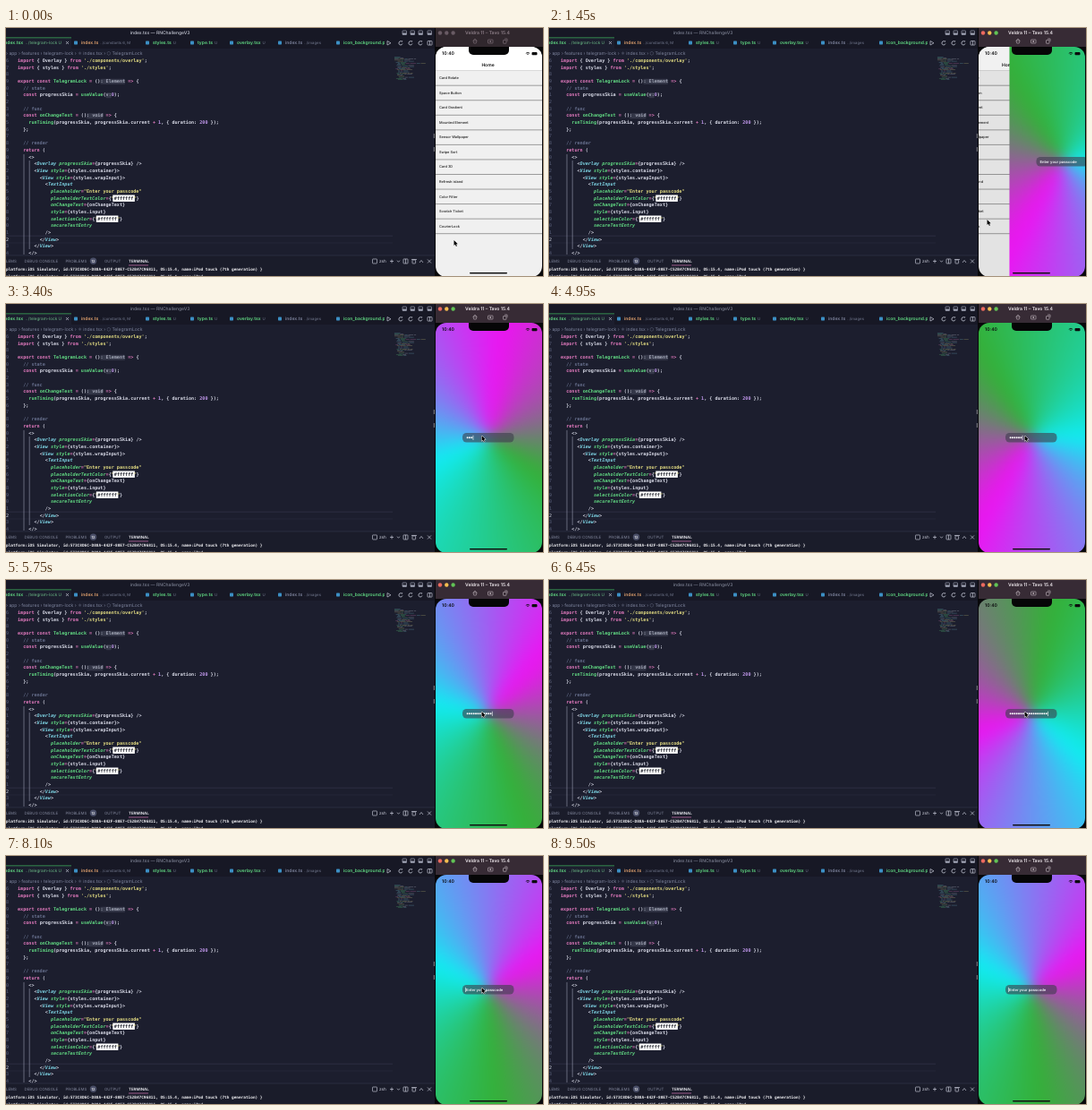
These frames come from a looping animation (600x277 px, 9550 ms). An HTML page with a canvas:

```html
<!DOCTYPE html>
<html lang="en">
<head>
<meta charset="utf-8">
<title>Passcode lock demo</title>
<style>
html, body { margin: 0; width: 100%; height: 100%; overflow: hidden; background: #1c1e2e; }
canvas { display: block; }
</style>
</head>
<body>
<canvas id="stage" width="600" height="277"></canvas>
<script>
const ctx = document.getElementById('stage').getContext('2d');
const LOOP = 9550;
const SANS = 'Inter, sans-serif', MONO = '"DejaVu Sans Mono", monospace';
const PHONE = { x: 480, y: 21, w: 119, h: 257 };

// One key letter per syntax colour; upper case means italic.
const INK = {
  p: '#e57bc0', w: '#d9dbe8', g: '#62dc84', c: '#7fd6e6', y: '#e3dc82',
  o: '#c49af0', m: '#68718f', h: '#a4a8b8', x: '#22242e'
};
const CODE = [
  "~pimport ~w{ Overlay } ~pfrom ~y'./components/overlay'~w;",
  "~pimport ~w{ styles } ~pfrom ~y'./styles'~w;",
  "",
  "~pexport const ~gTelegramLock ~p= ~w()~h: Element~p => ~w{",
  "  ~m// state",
  "  ~pconst ~wprogressSkia ~p= ~guseValue~w(~hv:~o0~w);",
  "",
  "  ~m// func",
  "  ~pconst ~gonChangeText ~p= ~w()~h: void~p => ~w{",
  "    ~grunTiming~w(progressSkia, progressSkia.current ~p+ ~o1~w, { duration: ~o200 ~w});",
  "  ~w};",
  "",
  "  ~m// render",
  "  ~preturn ~w(",
  "    ~w<>",
  "      ~w<~COverlay ~GprogressSkia~p=~w{progressSkia} />",
  "      ~w<~CView ~Gstyle~p=~w{styles.container}>",
  "        ~w<~CView ~Gstyle~p=~w{styles.wrapInput}>",
  "          ~w<~CTextInput",
  "            ~Gplaceholder~p=~y\"Enter your passcode\"",
  "            ~GplaceholderTextColor~p=~w{~y\"~x#ffffff~y\"~w}",
  "            ~GonChangeText~p=~w{onChangeText}",
  "            ~Gstyle~p=~w{styles.input}",
  "            ~GselectionColor~p=~w{~y\"~x#ffffff~y\"~w}",
  "            ~GsecureTextEntry",
  "          ~w/>",
  "        ~w</~CView~w>",
  "      ~w</~CView~w>",
  "    ~w</>"
];
const ROWS = ['Card Rotate', 'Space Button', 'Card Gradient', 'Mounted Element',
  'Sensor Wallpaper', 'Swipe Sort', 'Card 3D', 'Refresh island', 'Color Filter',
  'Scratch Ticket', 'CourierLock'];

const series = (count, start, step) => Array.from({ length: count }, (_, i) => start + i * step);
const typed = [2600, 2850, 3280, 4150, 4400, 4650, ...series(12, 5115, 110), 6470, 6600];
const CLEARED = 7600;
const presses = [...typed, CLEARED];

const clamp = v => Math.max(0, Math.min(1, v));
const smooth = v => { v = clamp(v); return v * v * (3 - 2 * v); };

function rect(x, y, w, h, color, radius = 0) {
  ctx.fillStyle = color;
  ctx.beginPath();
  ctx.roundRect(x, y, w, h, radius);
  ctx.fill();
}

function text(str, x, y, color, size = 5, weight = 400, family = SANS, align = 'left') {
  ctx.font = `${weight} ${size}px ${family}`;
  ctx.textAlign = align;
  ctx.fillStyle = color;
  ctx.fillText(str, x, y);
  return ctx.measureText(str).width;
}

function line(points, color, width = 0.7) {
  ctx.strokeStyle = color;
  ctx.lineWidth = width;
  ctx.beginPath();
  for (let i = 0; i < points.length; i += 2) ctx.lineTo(points[i], points[i + 1]);
  ctx.stroke();
}

function box(x, y, w, h, color, radius = 0.5) {
  ctx.strokeStyle = color;
  ctx.lineWidth = 0.7;
  ctx.beginPath();
  ctx.roundRect(x, y, w, h, radius);
  ctx.stroke();
}

function arc(x, y, r, from, to, color) {
  ctx.strokeStyle = color;
  ctx.lineWidth = 0.8;
  ctx.beginPath();
  ctx.arc(x, y, r, from * Math.PI, to * Math.PI);
  ctx.stroke();
}

function disc(x, y, r, color) {
  ctx.fillStyle = color;
  ctx.beginPath();
  ctx.arc(x, y, r, 0, 7);
  ctx.fill();
}

function codeLine(source, y) {
  let x = 13;
  for (const part of source.split(/(~\w[^~]*)/)) {
    if (!part) continue;
    if (part[0] !== '~') { x += part.length * 3.08; continue; }
    const key = part[1], kind = key.toLowerCase(), str = part.slice(2);
    const width = str.length * 3.08;
    if (kind === 'h') rect(x, y - 3, width, 6, '#343748', 1);
    if (kind === 'x') rect(x - 1.5, y - 3.7, width + 3, 7.4, '#fff');
    text(str, x, y, INK[kind], 5.12, key === kind ? 700 : 'italic 700', MONO);
    x += width;
  }
}

function tab(x, name, color, note = '') {
  rect(x, 14.5, 4, 4, '#3c8fc4', 0.7);
  const w = text(name, x + 8, 16.8, color, 5, 600);
  text(note, x + 10 + w, 16.8, '#73798f', 4.3);
}

function minimap() {
  const hues = [INK.p, INK.c, INK.g, INK.w, INK.y];
  let seed = 7;
  const random = () => (seed = seed * 16807 % 2147483647) / 2147483647;
  ctx.globalAlpha = 0.36;
  for (let i = 0; i < 22; i++) {
    let x = 434 + (i < 4 ? 0 : 1 + random() * 4);
    const end = x + 4 + random() * (i < 12 ? 25 : 13);
    while (x < end) {
      const w = 2 + random() * 5;
      rect(x, 32 + i * 1.2, w, 0.6, hues[Math.floor(random() * 5)]);
      x += w + 0.8;
    }
  }
  ctx.globalAlpha = 1;
}

function editor(focused) {
  rect(0, 0, 480, 277, '#1c1e2e');
  rect(0, 0, 480, 23, '#171825');
  text('index.tsx — RNChallengeV3', 172, 5.5, focused ? '#c9ccd8' : '#7c8092', 5, 500, SANS, 'center');
  for (const x of [443, 452, 461, 471]) {
    box(x, 3, 4.5, 4.5, '#9ca0b0');
    rect(x, 5.5, 4.5, 2, '#9ca0b0');
  }

  rect(0, 11, 73, 12, '#1c1e2e');
  rect(0, 10.4, 73, 0.8, '#3fae5c');
  text('index.tsx', -3, 16.8, '#62dc84', 5, 600);
  text('../telegram-lock U', 22, 16.8, '#6bb985', 4.7);
  line([67, 15, 70, 18], '#c5c8d6');
  line([70, 15, 67, 18], '#c5c8d6');
  tab(76, 'index.ts', '#e2a26e', '../constants 6, M');
  tab(156, 'styles.ts', '#62dc84', 'U');
  tab(206, 'type.ts', '#62dc84', 'U');
  tab(250, 'overlay.tsx', '#62dc84', 'U');
  tab(304, 'index.ts', '#7d839c', '../images');
  rect(368, 11.2, 112, 11.8, '#171825');
  tab(369, 'icon_background.p', '#62dc84');
  rect(423, 9, 57, 14, '#171825');
  line([426, 14.5, 430, 16.8, 426, 19, 426, 14.5], '#c5c8d6');
  for (const x of [441, 452, 463]) {
    arc(x, 16.8, 2.1, 0.1, 1.7, '#c5c8d6');
    disc(x + 1.6, 14.8, 0.6, '#c5c8d6');
  }
  box(471, 14.5, 5, 4.5, '#c5c8d6');
  line([473.5, 14.5, 473.5, 19], '#c5c8d6');

  text('› app › features › telegram-lock › ⚛ index.tsx › ⬡ TelegramLock', 0, 28.3, '#7d839c', 5.1);

  line([0, 232.2, 432, 232.2], '#363a50', 0.6);
  line([0, 240, 432, 240], '#2b2e42', 0.6);
  line([20, 141, 20, 253], '#9a9eb2', 0.6);
  line([26.2, 148, 26.2, 247], '#9a9eb2', 0.6);
  CODE.forEach((source, i) => {
    const y = 36.8 + i * 7.67;
    text(String((6 + i) % 10), 0, y, i === 26 ? '#d5d8e4' : '#5a607a', 5.12, 400, MONO);
    codeLine(source, y);
  });
  minimap();

  rect(0, 254, 480, 23, '#1a1c2a');
  line([0, 254, 480, 254], '#34374a', 0.6);
  text('LEMS', 0, 260.5, '#83889d', 4.4);
  text('DEBUG CONSOLE', 20.5, 260.5, '#83889d', 4.4);
  text('PROBLEMS', 66.5, 260.5, '#83889d', 4.4);
  disc(97.5, 260.3, 3.7, '#4a4f68');
  text('12', 97.5, 260.6, '#fff', 4, 500, SANS, 'center');
  text('OUTPUT', 110, 260.5, '#83889d', 4.4);
  text('TERMINAL', 137, 260.5, '#f0f1f6', 4.4, 600);
  line([137, 265, 159, 265], '#d477b5');
  box(409.5, 258, 5, 5, '#b9bccb');
  text('zsh', 417, 260.6, '#d0d3df', 4.6);
  line([429, 260.5, 433, 260.5], '#c5c8d6');
  line([431, 258.5, 431, 262.5], '#c5c8d6');
  line([437, 259.7, 438.5, 261.3, 440, 259.7], '#c5c8d6');
  box(444, 258, 5, 5, '#c5c8d6');
  line([446.5, 258, 446.5, 263], '#c5c8d6');
  box(454, 259, 3.6, 4, '#c5c8d6');
  line([453, 258.5, 459, 258.5], '#c5c8d6');
  line([462, 262, 464, 259.5, 466, 262], '#c5c8d6');
  line([471, 258.5, 475, 262.5], '#c5c8d6');
  line([475, 258.5, 471, 262.5], '#c5c8d6');
  const output = 'platform:iOS Simulator, id:573C8D6C-D88A-442F-80E7-C52B47C96811, OS:15.4, name:iPod touch (7th generation) }';
  text(output, 0, 270.3, '#f2f2f5', 4.42, 700, MONO);
  text(output.slice(0, 83), 0, 278.2, '#d8d9e0', 4.42, 700, MONO);
}

function simulatorBar(focused) {
  rect(479, 0, 121, 277, '#08080a');
  rect(480, 0, 120, 21, focused ? '#372b35' : '#30272d');
  const ink = focused ? '#f1ebef' : '#8c7e87';
  ['#ee6a5f', '#f5bd4f', '#61c455'].forEach((color, i) =>
    disc(485 + i * 7.3, 5.5, 2.2, focused ? color : '#695b64'));
  text('Veldra 11 – Tavo 15.4', 538, 5.8, ink, 5.1, 600, SANS, 'center');
  const icon = focused ? '#b0a5ac' : '#7b6d76';
  line([521.5, 14.5, 524, 12, 526.5, 14.5], icon);
  box(522.4, 14, 3.2, 3, icon);
  box(538.5, 13, 5.5, 4, icon);
  disc(541.2, 15, 1, icon);
  box(555.5, 13.5, 3.5, 3.8, icon);
  line([557, 12, 560, 12, 560, 15], icon);
  rect(477.8, 118, 1.2, 5, '#77787f');
  rect(477.8, 133, 1.2, 5, '#77787f');
}

function listScreen(shift, dim) {
  const x = PHONE.x - shift;
  rect(x, PHONE.y, PHONE.w, PHONE.h, '#f0f0f0');
  rect(x, PHONE.y, PHONE.w, 26.5, '#fff');
  text('Home', x + 58.5, 41.3, '#111', 5, 600, SANS, 'center');
  line([x, 47.5, x + PHONE.w, 47.5], '#c8c8c8', 0.6);
  ROWS.forEach((name, i) => {
    const y = 56 + i * 16.55;
    text(name, x + 4, y, '#1c1c1c', 3.9, 500);
    line([x, y + 8.2, x + PHONE.w, y + 8.2], '#777', 0.7);
  });
  rect(PHONE.x, PHONE.y, PHONE.w, PHONE.h, `rgba(0,0,0,${0.08 * dim})`);
}

function lockScreen(shift, turn, count, focused) {
  const x = PHONE.x + shift, cx = x + PHONE.w / 2;
  const sweep = ctx.createConicGradient(turn * Math.PI / 180, cx, 149);
  ['#10ecf2', '#ec14f2', '#34b038', '#10ecf2'].forEach((color, i) => sweep.addColorStop(i / 3, color));
  ctx.save();
  ctx.beginPath();
  ctx.rect(x, PHONE.y, PHONE.w, PHONE.h);
  ctx.clip();
  ctx.filter = 'blur(8px)';
  rect(x - 30, PHONE.y - 30, PHONE.w + 60, PHONE.h + 60, sweep);
  ctx.restore();
  rect(x + 30, 144, 57.5, 10.5, 'rgba(60,60,75,.6)', 4.5);
  if (count) for (let i = 0; i < count; i++) disc(x + 35.6 + i * 2.36, 149.3, 0.95, '#fff');
  else text('Enter your passcode', x + 34, 149.5, '#f4f4f8', 4.15, 600);
  if (focused) rect(x + 33.4 + (count ? count * 2.36 + 1.2 : 0), 146.7, 0.6, 5.2, '#fff');
}

function phoneChrome() {
  rect(517, 20, 45, 10, '#060607', [0, 0, 5, 5]);
  text('10:40', 487, 28.8, '#0b0b0d', 5.1, 600);
  for (const r of [1.5, 3.1]) arc(583, 30.5, r, 1.25, 1.75, '#0b0b0d');
  rect(587.5, 27, 6, 3.2, '#0b0b0d', 0.9);
  rect(518, 273, 42, 1.4, '#111', 0.7);
}

function pointer(t) {
  const a = smooth((t - 350) / 700), b = smooth((t - 1700) / 500), c = smooth((t - 8500) / 400);
  ctx.save();
  ctx.translate(500.5 - 11 * a + 42 * b + 10 * c, 237 - 23 * a - 67 * b - 160 * c);
  ctx.beginPath();
  for (const [x, y] of [[0, 0], [0, 6], [1.4, 4.8], [2.4, 7], [3.4, 6.5], [2.5, 4.4], [4.3, 4.3]]) ctx.lineTo(x, y);
  ctx.closePath();
  ctx.fillStyle = '#000';
  ctx.strokeStyle = '#fff';
  ctx.lineWidth = 1;
  ctx.stroke();
  ctx.fill();
  ctx.restore();
}

// Each press turns the sweep by 60° in 200 ms, unless the next press cuts it short.
function sweepTurn(t) {
  return presses.reduce((sum, at, i) => {
    const end = Math.min(t, presses[i + 1] ?? LOOP);
    return sum + 60 * clamp((end - at) / 200);
  }, 0);
}

function draw(t) {
  const since = Math.max(0, t - 1315) * 0.0183;
  const left = since > 10 ? 0 : (1 + since) * Math.exp(-since);
  const shift = PHONE.w * left;
  const count = t < CLEARED ? typed.filter(at => at <= t).length : 0;
  const phoneFocused = t > 1150;

  ctx.textBaseline = 'middle';
  ctx.textRendering = 'geometricPrecision';
  editor(!phoneFocused);
  simulatorBar(phoneFocused);
  ctx.save();
  ctx.beginPath();
  ctx.roundRect(PHONE.x, PHONE.y, PHONE.w, PHONE.h, 12);
  ctx.clip();
  if (left > 0) listScreen(0.3 * (PHONE.w - shift), 1 - left);
  if (left < 1) lockScreen(shift, sweepTurn(t), count, t > 2250);
  phoneChrome();
  ctx.restore();
  pointer(t);
}

const start = performance.now();
function tick() {
  draw((performance.now() - start) % LOOP);
  requestAnimationFrame(tick);
}
tick();
</script>
</body>
</html>
```
